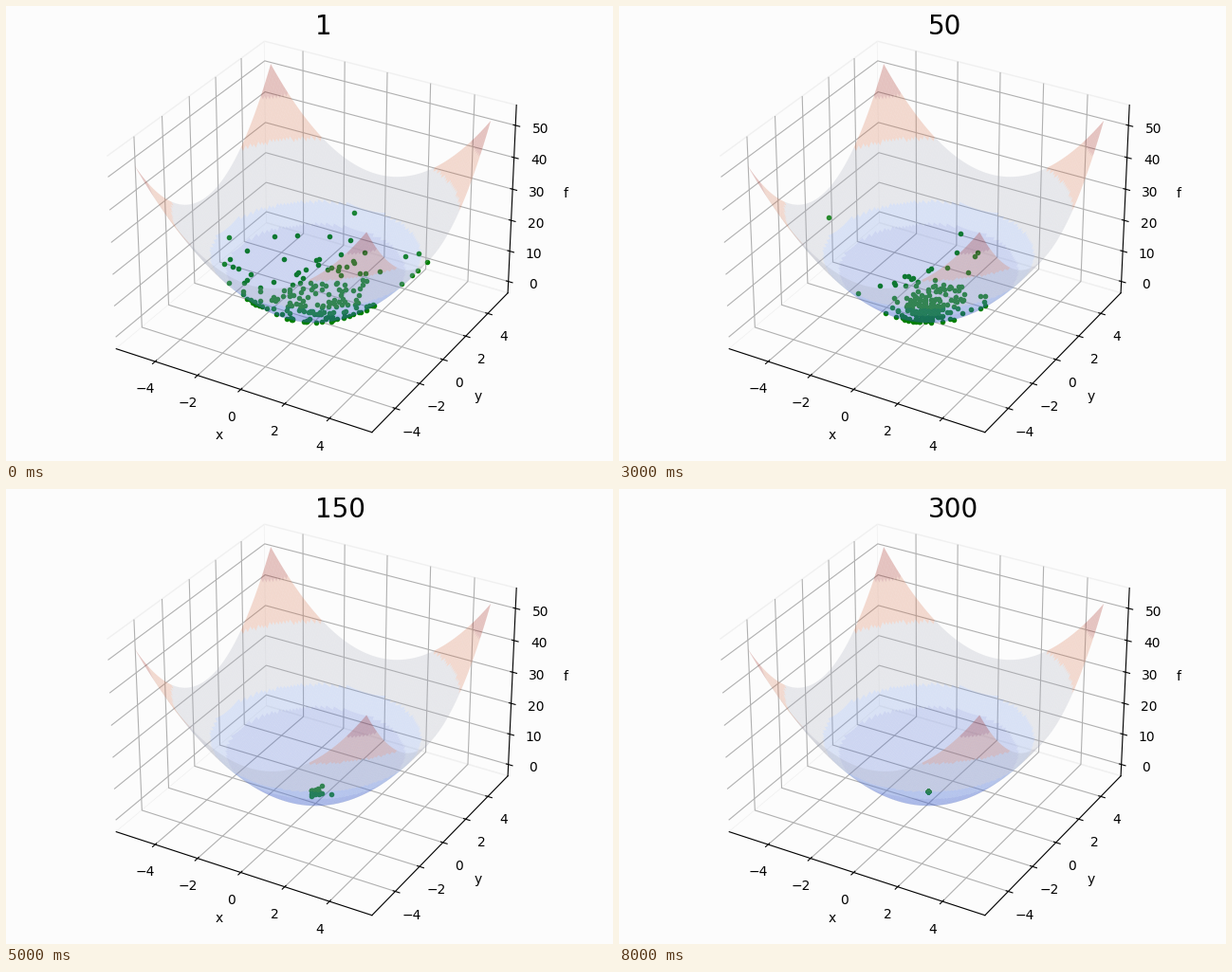
A matplotlib script that plays this animation: 640 px wide and 480 px high, repeating every 9000 ms.

```python
import numpy as np
import matplotlib.pyplot as plt
from matplotlib.animation import FuncAnimation
from matplotlib.colors import BoundaryNorm, ListedColormap

BG = "#fcfcfc"
R = 5.12
STEPS = [1, 2, 5, 50, 100, 150, 200, 250, 300]


def sphere(x, y):
    return x ** 2 + y ** 2


def swarm(step, count=200):
    """A heavy-tailed cloud on the bowl that closes in on the minimum."""
    rng = np.random.default_rng(step)
    spread = 1.4 * np.exp(-(step / 65) ** 1.5)
    xy = spread * rng.standard_t(3, (count, 2))
    x, y = xy[np.hypot(*xy.T) < 4.9].T
    return x, y, sphere(x, y)


fig = plt.figure(figsize=(6.4, 4.8), dpi=100, facecolor=BG)
ax = fig.add_axes([0, 0, 1, 1], projection="3d", facecolor=BG)
for axis in (ax.xaxis, ax.yaxis, ax.zaxis):
    axis.pane.set_facecolor(BG)
    axis.pane.set_edgecolor("#f0f0f0")
    axis.pane.set_alpha(1)

# Flat colour bands by height
bands = ListedColormap(["#4264d4", "#7094e4", "#a8acbc", "#d87048", "#a0180c"])
norm = BoundaryNorm([0, 13, 18, 33, 44, 53], bands.N)
side = np.linspace(-R, R, 101)
X, Y = np.meshgrid(side, side)
ax.plot_surface(X, Y, sphere(X, Y), cmap=bands, norm=norm, alpha=0.25,
                rcount=101, ccount=101, linewidth=0, edgecolor="none",
                antialiased=True)

dots, = ax.plot([], [], [], "g.")
title = fig.text(326 / 640, 450 / 480, "", fontsize=20, va="baseline")
ax.set(xlabel="x", ylabel="y", zlabel="f",
       xlim=(-5.867, 5.867), ylim=(-5.867, 5.867), zlim=(-3.82, 56.25))


def update(i):
    dots.set_data_3d(*swarm(STEPS[i]))
    title.set_text(str(STEPS[i]))
    return dots, title


anim = FuncAnimation(fig, update, frames=len(STEPS), interval=1000,
                     repeat=True, repeat_delay=0)
plt.show()
```
